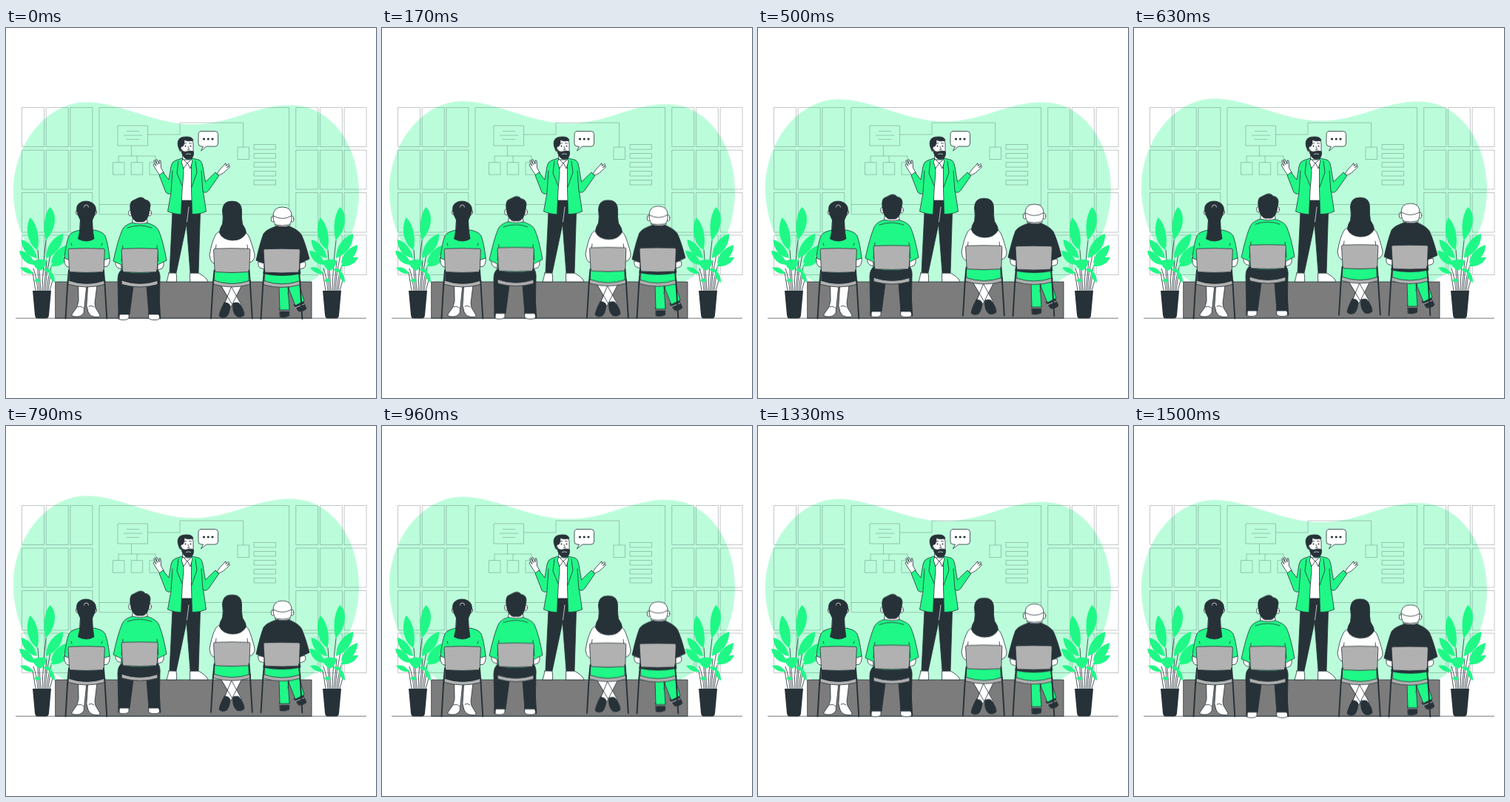
Write an HTML page without scripts that moves like this. It is 500 by 500 pixels and loops after 1540 ms.

```html
<!DOCTYPE html>
<html lang="en">
<head>
<meta charset="utf-8">
<title>Lecture</title>
<style>
  html, body { margin: 0; width: 100%; height: 100%; overflow: hidden; background: #fff; }
  svg { display: block; width: 100vw; height: 100vh; }
  .float { animation: float 1540ms linear infinite; }
  @keyframes float { 50% { transform: translateY(-6px); } }
  .wall { fill: none; stroke: #263238; stroke-opacity: .34; stroke-width: .8; }
  .ink { stroke: #263238; stroke-width: .8; stroke-linejoin: round; stroke-linecap: round; }
  .green { fill: #1ff886; }
  .dark { fill: #263238; }
  .white { fill: #fff; }
  .gray { fill: #b1b1b1; }
  .line { fill: none; }
  .light { fill: none; stroke: #fff; stroke-width: .7; }
</style>
</head>
<body>
<svg viewBox="0 0 500 500">
  <defs>
    <g id="column">
      <path d="M0 107.500h30v53H0zm0 57.500h30v53H0zm0 57.500h30v53.500H0zm0 57.500h30v53.500H0z"/>
    </g>
    <g id="windows">
      <use href="#column"/>
      <use href="#column" x="32.700"/>
      <use href="#column" x="65.400"/>
    </g>
    <path id="node" d="M0 0h15.500v16.500H0z"/>
    <path id="bar" d="M335 0h29.500v6.500H335z"/>

    <g id="chair" class="ink">
      <path class="gray" d="M0 42.500q25 9 50 0l-.5 5.500q-24.500 7-49 0z"/>
      <path class="gray" d="M0 1.500Q-.2 0 2 -.3q22.500-1 45.500 0 2 .2 1.800 2l-1 28q0 1.500-2 1.500-21.500 1.500-43 0-1.600 0-1.700-1.500z"/>
      <path class="line" stroke-width="1.900" d="M1 29L-.8 48-3.500 94M48 29l1.500 19 2.800 46"/>
    </g>

    <g id="plant">
      <path class="ink line" d="M40 355l-4-25M43 355q-1-16-6-30M45 355l-3-40M47 355l-4-55M49 355q1-36 5-68M51 355l4-40M53 355q1-24 7-49M55 355q1-16 6-32M57 355l3-23M59 355l4-14"/>
      <g class="green">
        <path d="M53.500 287c-4-16-2-36 6-45 9 8 10 28-6 45z"/>
        <path d="M42.500 300c-14-9-17-29-10-44 9 8 14 27 10 44z"/>
        <path d="M54 311c0-16 10-29 23-33 1 13-7 27-23 33z"/>
        <path d="M42 311c-13-2-21-12-21.500-25 10 2 19 12 21.500 25z"/>
        <path d="M39 320c-11 0-19-7-21-19 9 0 18 7 21 19z"/>
        <path d="M61 318c1-13 10-21 22-25 0 12-7 22-22 25z"/>
        <path d="M60 322c5-9 15-13 24-12-4 9-13 13-24 12z"/>
        <path d="M36 315q9-4 19-1-2 11-9 14-8-3-10-13z"/>
        <path d="M37 332q-10 2-18-8 11-3 18 8z"/>
        <path d="M57 328q9 2 9 16-8-4-9-16z"/>
        <path d="M50 326q7-3 12 2-5 5-12-2zM38 341q4-5 9 0-4 5-9 0z"/>
      </g>
      <path class="dark" d="M36 355h25l-3 33q-.5 4.500-4 4.500H43q-3.500 0-4-4.500z"/>
    </g>
  </defs>

  <path class="float" fill="#bbfddb" d="M10 214C14 149 60 100.200 108 100.200c47 0 92 30 144 30 53 0 83-26 133-26 55 0 92 55 92 117 0 68-37 108-77 128H80C35 324 8 269 10 214z"/>

  <g class="wall">
    <use href="#windows" x="21.500"/>
    <use href="#windows" x="391.700"/>
    <path d="M126 107.500h256.500v144.300H126zM126 238.500h256.500"/>
    <path d="M151 132h40.500v27H151zM163 139.500h17M159 145h25M163 150.500h17M191.500 144H235v-16h85.500v33M169.500 159v14M152 181.500V173h50v8.500M177 173v8.500"/>
    <use href="#node" x="144.500" y="181.700"/>
    <use href="#node" x="169.200" y="181.700"/>
    <use href="#node" x="194" y="181.700"/>
    <use href="#node" x="313" y="161"/>
    <use href="#bar" y="157.500"/>
    <use href="#bar" y="169.500"/>
    <use href="#bar" y="181.500"/>
    <use href="#bar" y="193.500"/>
    <use href="#bar" y="205.500"/>
  </g>

  <path class="ink" fill="#7c7c7c" stroke-width=".6" d="M67 343h346v49.200H67z"/>
  <path class="ink" stroke-opacity=".8" d="M13.500 392.200h473"/>

  <g id="speech">
    <path class="ink white" d="M264 139.500h18.500q4 0 4 4v12.500q0 4-4 4H271l-7.500 6 3-6H264q-4 0-4-4v-12.500q0-4 4-4z"/>
    <g class="dark"><circle cx="267.500" cy="150" r="1.600"/><circle cx="273.200" cy="150" r="1.600"/><circle cx="279" cy="150" r="1.600"/></g>
  </g>

  <g id="speaker" class="ink">
    <path class="white" d="M220 331h10q1 7 .5 12H217q2-6 3-12zM249 331h11q11 6 13 12h-24z"/>
    <path class="dark" d="M236 232h25l1.500 18-2.500 81h-11l-5-66-14 66-9-.5 4-82z"/>
    <path class="light" d="M247 242l-2.500 20"/>
    <path class="white" d="M237 178h14l.5 55H236z"/>
    <path class="white" d="M208 199l-5-7-4-7 1-1.500 3 3-3.500-7 1-1 4 6-2-6.500 1.500-.5 3 6.500v-5l1.700 0q1 6 .8 10l4 7zM285 197l5-7 5-5 1-2 1.500.5-.5 3 4-3 .8 1-3.300 4 3.500-2 .5 1.200-5 5q-4 4-9 6z"/>
    <path class="green" d="M238 176l-9 3q-5 2-6 8l-3 18-8-10-5 4 9 23q4 4 7 1l-4.500 25q9 3.500 18 4l1.500-32 2-25z"/>
    <path class="green" d="M251 176l9 2q4 1 5.500 7l4 23 13.500-13 4.500 5-14 20q-4 4-7 1l4 27q-9 4-19 3.500l-1-35z"/>
    <path class="line" d="M225 193l-2 29M264 193l2 28M233 180l-2 16 7 17M256 180l2 15-7 20"/>
    <path class="white" d="M239 169h12v8l-6 6-6-6zM239 177l-2 4 3 9 5-8 4 8 3-10-2-4"/>
    <path class="white" d="M236 152q1-4 8-4 9 0 9 9v9q0 9-8 9-8-1-9-12z"/>
    <path class="dark" d="M235 166q-4-8-2.500-13 1.500-6 10.500-6 9-.5 10 5-8 2-12-1 .5 6-2 9-4-1-3 6z"/>
    <path class="dark" d="M237 164q2 4 7 3 5-2 9.500 0 1 10-7 10.500-8 0-9.500-13.500z"/>
    <path class="light" d="M243.500 170.500q3-1.500 6 0"/>
    <path class="line" d="M240.500 156.500l3-1M247.500 155.500l3 .5M246 160l1.500 4.500-2 .3"/>
    <g class="dark" stroke="none"><circle cx="242.500" cy="159.500" r="1"/><circle cx="249.500" cy="159.500" r="1"/></g>
  </g>

  <use href="#plant"/>
  <use href="#plant" x="392"/>

  <g id="ponytail" class="ink">
    <path class="white" d="M98 347h11l-3 29-1 9q-3 5-9 5-8 0-7-3l7-10 2-8zM111 347h12l-3 25 1 6 6 10q0 3-5 2.500-8 0-11-7l-2-8z"/>
    <path class="line" d="M97 377q5-2 8 2M112 376q4-2 7 1"/>
    <path class="dark" d="M86 327h46l1 17q-23 8-48 0z"/>
    <path class="white" d="M79 310l7 1 1 13-5-2q-4-3-3-12zM133 311l7-1q1 8-3 12l-5 1z"/>
    <path class="green" d="M101 273q-13 2-16 8-4 10-6 30l8 3v15q22 4 44 0v-15l9-3q-2-20-6-30-3-6-15-8z"/>
    <path class="line" d="M88 291l1 3M130 291l-1 3M87 300v10M132 300v10"/>
    <ellipse class="white" cx="96.500" cy="249" rx="2" ry="3.500"/>
    <ellipse class="white" cx="120.500" cy="249" rx="2" ry="3.500"/>
    <path class="white" d="M101 258h15l1 16h-17z"/>
    <path class="dark" d="M97 252q-3-8 0-13 4-5 11-5t11.500 5q3.500 5 .5 13l-3.500 8q0 12 2.500 25-10 6-21.500 0 3.500-13 3-25z"/>
    <path class="light" stroke-width="1.300" d="M105.500 242q0-3 3-3t3 3"/>
  </g>
  <use href="#chair" x="84" y="298.500"/>

  <g class="float">
    <g id="man" class="ink">
      <path class="white" d="M153 384h13v8q-2 3-8 2.500-7 0-7-4zM193 384h12l3 7q-1 4-8 3.500-6 0-7-2.500z"/>
      <path class="dark" d="M157 326h47q5 3 4 15l-1 46h-14l-3-38q-9-4-18 0l-5 38h-15l-1-47q0-10 6-14z"/>
      <path class="white" d="M148 315l8 2v9l-5-2q-4-3-3-9zM205 317l8-2q1 7-2 10l-6 2z"/>
      <path class="green" d="M171 263q-11 3-14 10-6 14-12 42l11 5v9q25 5 49 0v-9l12-6q-5-28-11-41-3-6-16-10z"/>
      <path class="line" d="M158 294l-2 21M204 294l2 21M164 270q17-6 33 0"/>
      <path class="white" d="M172 254h18l1 9q-9 3-20 0z"/>
      <ellipse class="white" cx="168" cy="250" rx="2.300" ry="4"/>
      <ellipse class="white" cx="194" cy="250" rx="2.300" ry="4"/>
      <path class="dark" d="M169 251q-3-13 1-17 4-2 8-4 6-3 10 2 7 1 7 8l-2 12q-3 9-8 10h-8q-6-2-8-11z"/>
    </g>
    <use href="#chair" x="156" y="298.500"/>

    <g id="longhair" class="ink">
      <path class="white" d="M289 345h13l16 29-8 6zM307 345h13l-16 32-9-3z"/>
      <path class="dark" d="M295 371q7 0 8 5-1 10-5 14-6 3-10-1 1-7 7-18zM307 372q5-2 8 0 7 9 7 16-4 4-10 2-7-6-5-18z"/>
      <path class="green" d="M282 327h46v18q-22 8-46 0z"/>
      <path class="white" d="M295 273q-10 2-12 7-5 9-8 27 1 8 4 10l4 2v10q22 3 44 0v-11l6-3q4-4 3-9-4-16-8-25-3-6-14-8z"/>
      <path class="line" d="M284 293l-2 16M326 293l2 16"/>
      <path class="dark" d="M292.500 247q0-13 13-13t13 13q-.5 10 1 18 5 7 5 12-5 10-19 10-13-1-17-10 0-6 4-12 1.500-8 0-18z"/>
    </g>
    <use href="#chair" x="280.500" y="298.500"/>

    <g id="elder" class="ink">
      <path class="dark" d="M370 379h13l-.5 10q-6 3-12 1.500zM389 374l12-6 5 11q-3 4-10 4z"/>
      <path class="light" d="M370 382h13M391 378l12-5"/>
      <path class="green" d="M350 331h46l1 18 6 20-12 6-10-25 2 31h-13l-1-32-19-4z"/>
      <path class="line" d="M383 347l-2 13"/>
      <path class="dark" d="M349 326h48l1 6q-25 5-50 0z"/>
      <path class="white" d="M341 316l8 2v8l-6-2q-3-3-2-8zM397 317l7-1q2 6-1 8l-6 2z"/>
      <path class="dark" d="M365 268q-13 4-17 10-5 13-10 36l11 4v9h48v-9l13-6q-6-23-11-33-4-6-16-11-9-2-18 0z"/>
      <path class="white" d="M365 259h18l1 8q-9 3-20 0z"/>
      <ellipse class="white" cx="360.500" cy="258" rx="2.300" ry="4"/>
      <ellipse class="white" cx="386.500" cy="258" rx="2.300" ry="4"/>
      <path class="white" d="M361 256q-1-14 12.500-14t12.500 14q0 8-4 10-9 2-17 0-3-2-4-10z"/>
      <path class="line" d="M361.500 254q12 7 24 0"/>
    </g>
    <use href="#chair" x="348" y="299"/>
  </g>
</svg>
</body>
</html>
```
